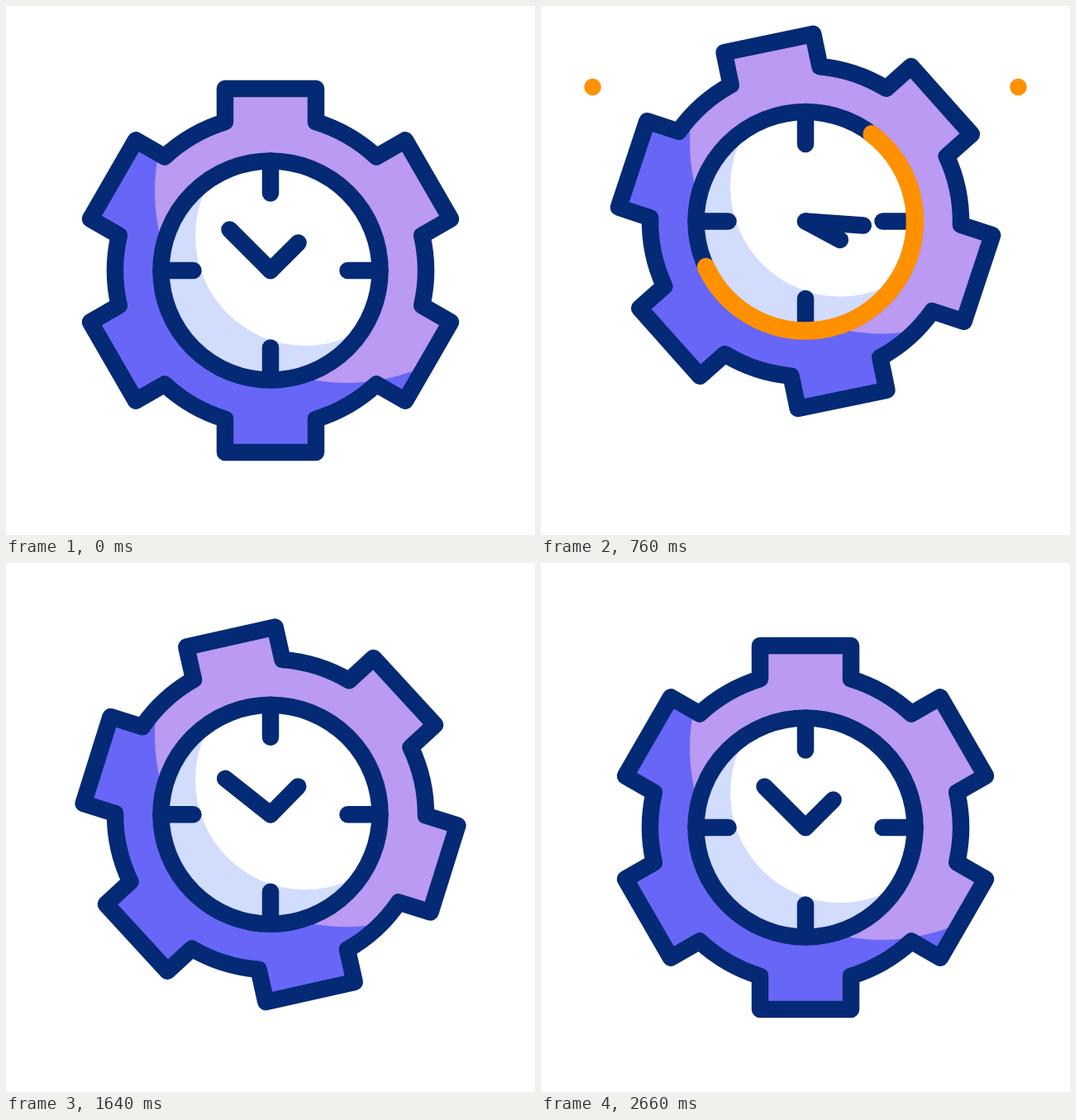
Recreate the animation shown at these times as an HTML page with a canvas. Size 640 by 640 pixels, loop 2.8 s.

```html
<!DOCTYPE html>
<html lang="en">
<head>
<meta charset="utf-8">
<title>Gear clock</title>
<style>
  html, body { margin: 0; width: 100%; height: 100%; overflow: hidden; background: #fff; }
  canvas { display: block; width: 640px; height: 640px; }
</style>
</head>
<body>
<canvas id="stage" width="640" height="640"></canvas>
<script>
const ctx = document.getElementById('stage').getContext('2d');
const LOOP = 2800, STEP = 20, TAU = Math.PI * 2;
const NAVY = '#042a75', LILAC = '#ba9af2', VIOLET = '#6866f7';
const PALE = '#d2dcfd', WHITE = '#fff', ORANGE = '#ff9100';
const RING = 132.5;

const rad = deg => deg * Math.PI / 180;
const clamp = x => Math.max(0, Math.min(1, x));
const progress = (t, from, to) => clamp((t - from) / (to - from));
const smooth = p => p * p * (3 - 2 * p);
const easeOut = p => 1 - (1 - p) * (1 - p);

// Monotone cubic curve through [time, value] keys, flat at both ends and at peaks.
function track(...keys) {
  const n = keys.length;
  const slope = i => (keys[i + 1][1] - keys[i][1]) / (keys[i + 1][0] - keys[i][0]);
  const tangent = keys.map((_, i) => {
    if (i === 0 || i === n - 1) return 0;
    const a = slope(i - 1), b = slope(i);
    return a * b > 0 ? 2 * a * b / (a + b) : 0;
  });
  return t => {
    if (t <= keys[0][0]) return keys[0][1];
    if (t >= keys[n - 1][0]) return keys[n - 1][1];
    const i = keys.findIndex(k => k[0] > t) - 1;
    const [t0, v0] = keys[i], [t1, v1] = keys[i + 1];
    const d = t1 - t0, p = (t - t0) / d, s = smooth(p);
    return v0 + (v1 - v0) * s
      + d * p * (1 - p) * ((1 - p) * tangent[i] - p * tangent[i + 1]);
  };
}

const bounce = track([200, 0], [370, 51], [780, -60.3], [1080, -22], [1295, 32],
  [1400, 22.5], [1580, -20], [1865, 17.6], [2150, -14.5], [2380, -10], [2660, 0]);
const gearTurn = track([200, 0], [370, 8.7], [760, -71.7], [1080, -240],
  [1400, -336.7], [1590, -375], [1870, -346.7], [2150, -370], [2380, -367], [2660, -360]);
const hourTurn = track([200, 0], [370, -8.7], [760, 73.2], [1080, 236],
  [1400, 324.7], [1800, 369], [1880, 367.7], [2400, 360]);
const minuteTurn = track([200, 0], [370, -20.6], [760, 139.1], [1080, 462.2],
  [1400, 643.7], [1810, 734], [1880, 732.7], [2400, 720]);

function gearPath(turn) {
  const path = new Path2D();
  const half = 55, tip = 220, body = 188;
  const base = Math.sqrt(body * body - half * half);
  const gap = Math.asin(half / body);
  for (let i = 0; i < 6; i++) {
    const a = rad(turn + i * 60), c = Math.cos(a), s = Math.sin(a);
    for (const [x, y] of [[-half, -base], [-half, -tip], [half, -tip], [half, -base]])
      path.lineTo(x * c - y * s, x * s + y * c);
    const top = a - Math.PI / 2;
    path.arc(0, 0, body, top + gap, top + Math.PI / 3 - gap);
  }
  path.closePath();
  return path;
}

function discPath(r) {
  const path = new Path2D();
  path.arc(0, 0, r, 0, TAU);
  return path;
}

// Fills a shape with its shade colour and a round highlight clipped inside it.
function shaded(path, shade, light, x, y, r) {
  ctx.save();
  ctx.fillStyle = shade;
  ctx.fill(path);
  ctx.clip(path);
  ctx.fillStyle = light;
  ctx.beginPath();
  ctx.arc(x, y, r, 0, TAU);
  ctx.fill();
  ctx.restore();
  ctx.strokeStyle = NAVY;
  ctx.stroke(path);
}

function line(x0, y0, x1, y1) {
  ctx.beginPath();
  ctx.moveTo(x0, y0);
  ctx.lineTo(x1, y1);
  ctx.stroke();
}

function spoke(deg, from, to) {
  const x = Math.sin(rad(deg)), y = -Math.cos(rad(deg));
  line(x * from, y * from, x * to, y * to);
}

function drawSweep(t) {
  const start = smooth(progress(t, 635, 1262));
  const end = easeOut(progress(t, 420, 1200));
  if (end <= 0 || start >= 1) return;
  ctx.beginPath();
  ctx.arc(0, 0, RING, start * TAU - Math.PI / 2, end * TAU - Math.PI / 2);
  ctx.stroke();
}

function drawSparks(t) {
  if (t < 580 || t >= 780) return;
  const head = easeOut(progress(t, 560, 700)), tail = smooth(progress(t, 620, 760));
  const x = p => 222 + 35.5 * p, y = p => 120 - 22 * p;
  for (const side of [-1, 1])
    line(320 + side * x(tail), y(tail), 320 + side * x(head), y(head));
}

function draw(t) {
  ctx.fillStyle = WHITE;
  ctx.fillRect(0, 0, 640, 640);
  ctx.lineCap = ctx.lineJoin = 'round';
  ctx.lineWidth = 20.5;

  ctx.strokeStyle = ORANGE;
  drawSparks(t);

  ctx.save();
  ctx.translate(320, 320 + bounce(t));
  shaded(gearPath(gearTurn(t)), VIOLET, LILAC, 92, -96, 232);
  shaded(discPath(RING), PALE, WHITE, 42, -42, 133);
  for (let deg = 0; deg < 360; deg += 90) spoke(deg, RING, 93.5);
  spoke(315 + minuteTurn(t), 0, 70);
  spoke(45 + hourTurn(t), 0, 47.5);
  ctx.strokeStyle = ORANGE;
  ctx.lineWidth = 21.5;
  drawSweep(t);
  ctx.restore();
}

let origin;
function frame(now) {
  origin ??= now;
  const t = (now - origin) % LOOP;
  draw(Math.floor(t / STEP + 0.001) * STEP);
  requestAnimationFrame(frame);
}
draw(0);
requestAnimationFrame(frame);
</script>
</body>
</html>
```
